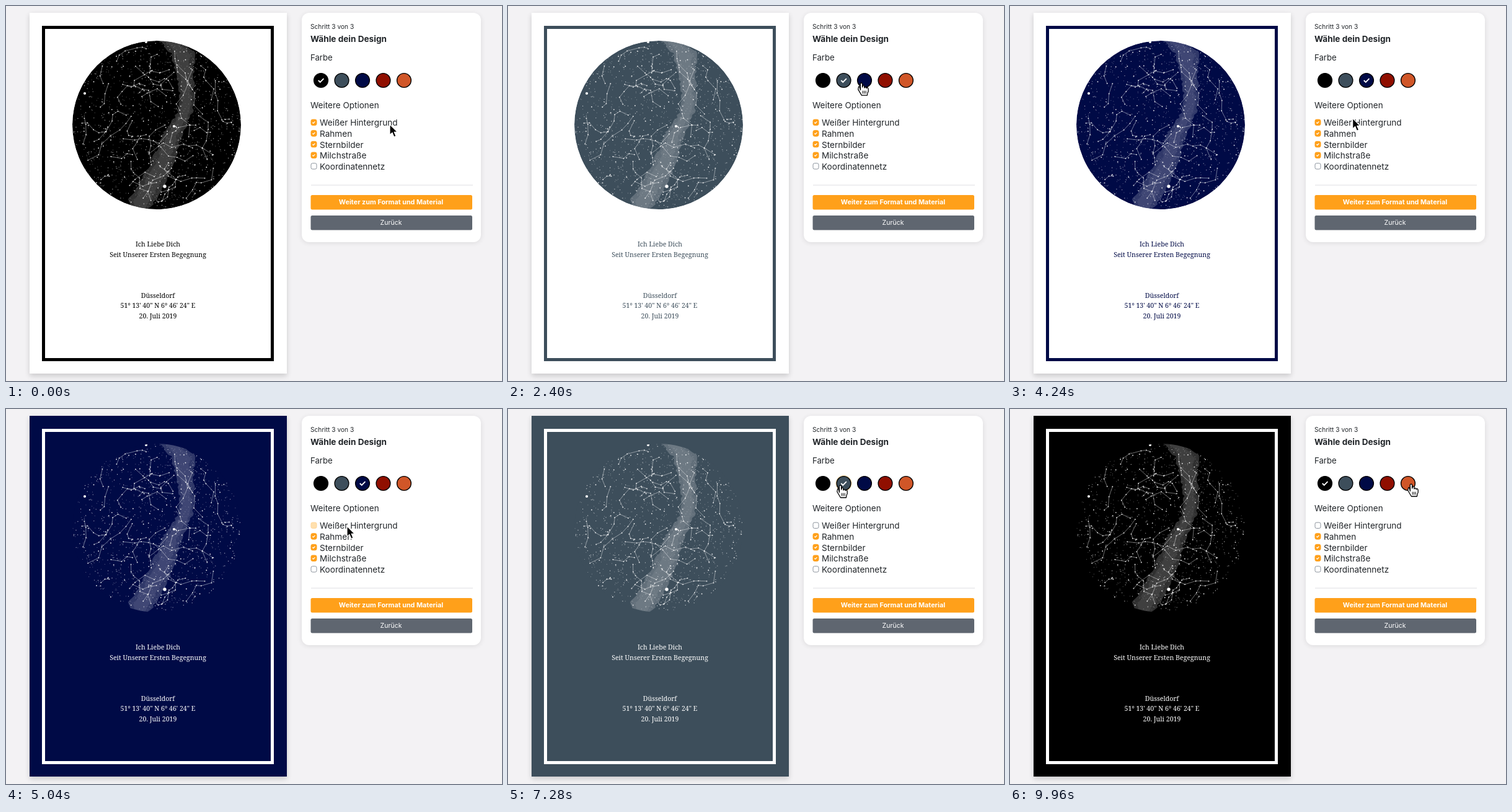
Write an HTML page that moves like this. It is 800 px wide and 605 px high and loops after 10000 ms.

```html
<!DOCTYPE html>
<html lang="de">
<head>
<meta charset="utf-8">
<title>Sternenkarte</title>
<style>
html, body { margin: 0; width: 100%; height: 100%; overflow: hidden; background: #f3f2f4; }
svg { display: block; width: 800px; height: 605px; }
.ui { font-family: Inter, "Open Sans", sans-serif; fill: #212529; }
.verse { font: 500 10.6px "Noto Serif", serif; text-anchor: middle; }
.mid { text-anchor: middle; fill: #fff; }
.bold { font-weight: 700; }
</style>
</head>
<body>
<svg viewBox="0 0 800 605">
  <defs>
    <clipPath id="round"><circle cx="243" cy="192" r="136"/></clipPath>
    <clipPath id="bandClip"><use href="#band"/></clipPath>
    <filter id="soft" x="-10%" y="-10%" width="120%" height="120%"><feGaussianBlur stdDeviation="4"/></filter>
  </defs>
  <rect width="800" height="605" fill="#f3f2f4"/>
  <rect x="38" y="14" width="415" height="583" fill="#000" opacity=".16" filter="url(#soft)"/>
  <rect id="paper" x="38" y="11" width="415" height="582"/>
  <rect id="frame" x="60.5" y="34.5" width="369" height="536" fill="none" stroke-width="5"/>
  <g clip-path="url(#round)">
    <circle id="disc" cx="243" cy="192" r="136"/>
    <path id="band" fill="#fff" fill-opacity=".19"/>
    <path id="core" fill="#fff" fill-opacity=".07"/>
    <g id="dust" clip-path="url(#bandClip)"></g>
    <g id="stars"></g>
    <g id="signs"></g>
  </g>
  <g id="verses" class="verse"></g>

  <rect x="477" y="13" width="289" height="369" rx="12" fill="#000" opacity=".1" filter="url(#soft)"/>
  <rect x="477" y="11" width="289" height="370" rx="12" fill="#fff"/>
  <g class="ui">
    <text x="491" y="36.6" font-size="10.2">Schritt 3 von 3</text>
    <text x="491" y="58" font-size="13.6" class="bold">Wähle dein Design</text>
    <text x="491" y="87.5" font-size="13.2">Farbe</text>
    <text x="491" y="165" font-size="13.5">Weitere Optionen</text>
    <g id="swatches"></g>
    <g id="options" font-size="13.6"></g>
    <path d="M492 289H753" stroke="#dedee2"/>
    <rect x="491.5" y="305" width="260.5" height="23.5" rx="2.5" fill="#ffa01a"/>
    <text x="621" y="320.4" font-size="10.8" class="mid bold">Weiter zum Format und Material</text>
    <rect x="491.5" y="338" width="260.5" height="23.5" rx="2.5" fill="#5f6670"/>
    <text x="621" y="353.4" font-size="10.6" class="mid">Zurück</text>
  </g>

  <path id="arrow" fill="#000" stroke="#fff" stroke-width="1.2" stroke-linejoin="round"
    d="M0 0V17L4 13.4 6.8 20.2 10 18.9 7.2 12.3H12.3Z"/>
  <g id="hand" stroke="#000" stroke-width="1.3" stroke-linejoin="round" stroke-linecap="round">
    <path fill="#fff" d="M-1.6 1.2Q0-1 1.6 1.2V7Q4-.5 5 8 7 5 8.2 8.6 10 6 11.2 9.8V13.5Q9.6 16 9.4 20H.4L-5.2 10.5Q-4-0 -1.6 11.4Z" transform="translate(0 0)"/>
    <path fill="none" stroke-width="1" d="M2.2 13V17M4.7 13V17M7.2 13V17"/>
  </g>
</svg>
<script>
const NS = "http://www.w3.org/2000/svg";
const $ = id => document.getElementById(id);
function add(parent, tag, attrs, text) {
  const el = document.createElementNS(NS, tag);
  set(el, attrs);
  if (text) el.textContent = text;
  return parent.appendChild(el);
}
function set(el, attrs) {
  for (const k in attrs) el.setAttribute(k, attrs[k]);
}
const show = (el, on) => set(el, { visibility: on ? "visible" : "hidden" });
const ease = u => u * u * (3 - 2 * u);

let seed = 71;
function rnd() {
  seed = (seed * 16807) % 2147483647;
  return seed / 2147483647;
}
const spread = size => (rnd() - .5) * size;
const polar = (r, a) => [243 + r * Math.cos(a), 192 + r * Math.sin(a)];
const point = p => p.map(v => v.toFixed(1)).join(" ");

// round dots drawn as zero-length strokes
function dots(parent, points, size, opacity) {
  const d = points.map(p => `M${point(p)}h0`).join("");
  add(parent, "path", { d, stroke: "#fff", "stroke-width": size, "stroke-linecap": "round", opacity });
}
function scatter(parent, count, size, opacity) {
  const points = Array.from({ length: count }, () => polar(135 * Math.sqrt(rnd()), rnd() * Math.PI * 2));
  dots(parent, points, size, opacity);
}

// Milky Way: y, centre and half width, joined with ragged edges
const river = [
  [54, 263, 17], [76, 285, 20], [102, 288, 15], [140, 291, 11], [172, 289, 12],
  [205, 269, 15], [250, 254, 19], [290, 234, 22], [312, 220, 23], [330, 214, 14]
];
function riverPath(scale) {
  const left = [], right = [];
  for (let i = 1; i < river.length; i++) {
    const [y0, x0, w0] = river[i - 1], [y1, x1, w1] = river[i];
    for (let y = y0; y < y1; y += 4) {
      const u = (y - y0) / (y1 - y0);
      const x = x0 + (x1 - x0) * u, w = (w0 + (w1 - w0) * u) * scale;
      left.push([x - w + spread(5), y]);
      right.unshift([x + w + spread(5), y]);
    }
  }
  return "M" + left.concat(right).map(point).join("L") + "Z";
}
set($("band"), { d: riverPath(1) });
set($("core"), { d: riverPath(.6) });

scatter($("dust"), 1500, 1, .2);
scatter($("stars"), 700, .9, .5);
scatter($("stars"), 380, 1.3, .72);
scatter($("stars"), 90, 1.9, .85);

// constellations: short wandering lines started on a sunflower spiral
function constellation(i, count) {
  let p = polar(128 * Math.sqrt((i + .5) / count), i * 2.4);
  let angle = rnd() * Math.PI * 2;
  const line = [p];
  const steps = 3 + Math.floor(rnd() * 4);
  for (let k = 0; k < steps; k++) {
    angle += spread(2.4);
    const len = 6 + rnd() * 14;
    p = [p[0] + len * Math.cos(angle), p[1] + len * Math.sin(angle)];
    if (Math.hypot(p[0] - 243, p[1] - 192) > 131) break;
    line.push(p);
  }
  add($("signs"), "polyline", { points: line.map(point).join(" "), fill: "none", stroke: "#fff", "stroke-width": .8, opacity: .55 });
  dots($("signs"), line, 2, .8);
}
for (let i = 0; i < 46; i++) constellation(i, 46);
dots($("signs"), [[127, 141], [226, 58], [271, 194]], 4.2, 1);
dots($("signs"), [[256, 291]], 5.4, 1);

const verses = [
  ["Ich Liebe Dich", 388.3], ["Seit Unserer Ersten Begegnung", 405],
  ["Düsseldorf", 470.8], ["51° 13' 40\" N 6° 46' 24\" E", 487.3], ["20. Juli 2019", 503.8]
];
for (const [text, y] of verses) add($("verses"), "text", { x: 245, y }, text);

const colors = ["#000000", "#3d4e5b", "#000a46", "#900f00", "#d05628"];
const dotX = i => 508 + 33.5 * i, dotY = 120;
const tick = (x, y, s) => `M${x - 4 * s} ${y}l${2.8 * s} ${2.8 * s} ${5.4 * s} ${-5.6 * s}`;
const swatches = colors.map((fill, i) => {
  const g = $("swatches"), cx = dotX(i);
  const ring = add(g, "circle", { cx, cy: dotY, r: 13.2, fill: "#ffe5b8" });
  add(g, "circle", { cx, cy: dotY, r: 11.4, fill, stroke: "#000", "stroke-width": 1.4 });
  const mark = add(g, "path", { d: tick(cx, dotY, 1.05), fill: "none", stroke: "#fff", "stroke-width": 1.8 });
  return { ring, mark };
});

const labels = ["Weißer Hintergrund", "Rahmen", "Sternbilder", "Milchstraße", "Koordinatennetz"];
const boxes = labels.map((label, i) => {
  const y = 188 + i * 17.65;
  add($("options"), "text", { x: 506, y: y + 5.2 }, label);
  return {
    box: add($("options"), "rect", { x: 492, y: y - 4.9, width: 9, height: 9.4, rx: 2.4 }),
    mark: add($("options"), "path", { d: tick(496.3, y - .2, .5), fill: "none", stroke: "#fff", "stroke-width": 1.3 })
  };
});
function check({ box, mark }, on, pressed) {
  set(box, {
    fill: pressed ? "#ffe0ae" : on ? "#ffa01a" : "#fff",
    stroke: pressed ? "#ffd596" : on ? "#ffa01a" : "#8b939c"
  });
  show(mark, on && !pressed);
}
boxes.forEach((b, i) => check(b, i < 4));

// pointer stops: arrival, departure, x, y
const stops = [
  [0, 350, 619, 191], [1200, 1750, 550, 125], [2550, 3300, 572, 124], [4500, 5250, 550, 189],
  [6700, 7400, 536, 123], [8150, 8800, 511, 120], [9700, 10000, 647, 121]
];
const clicks = [[0, 0], [1640, 1], [2700, 2], [6900, 1], [8240, 0]];
const TOGGLE = 4860;
const last = (list, t) => list.filter(e => e[0] <= t).pop();

function pointer(t) {
  const from = last(stops, t), to = stops[stops.indexOf(from) + 1];
  const [, leave, x, y] = from;
  if (!to || t < leave) return [x, y];
  const e = ease((t - leave) / (to[0] - leave));
  return [x + (to[2] - x) * e, y + (to[3] - y) * e];
}

function draw(t) {
  const [x, y] = pointer(t);
  const over = colors.findIndex((c, i) => Math.hypot(x - dotX(i), y - dotY) < 13);
  const pick = last(clicks, t)[1];
  const color = colors[pick], white = t < TOGGLE;
  const ink = white ? color : "#fff";

  set($("paper"), { fill: white ? "#fff" : color });
  set($("frame"), { stroke: ink });
  set($("verses"), { fill: ink });
  set($("disc"), { fill: color });

  swatches.forEach(({ ring, mark }, i) => {
    show(mark, i === pick);
    show(ring, i === pick && i === over);
  });
  check(boxes[0], white, t >= TOGGLE && t < TOGGLE + 260);

  const transform = `translate(${x.toFixed(2)} ${y.toFixed(2)})`;
  set($("arrow"), { transform });
  set($("hand"), { transform });
  show($("arrow"), over < 0);
  show($("hand"), over >= 0);
}

let start;
function loop(now) {
  start ??= now;
  draw((now - start) % 10000);
  requestAnimationFrame(loop);
}
draw(0);
requestAnimationFrame(loop);
</script>
</body>
</html>
```
